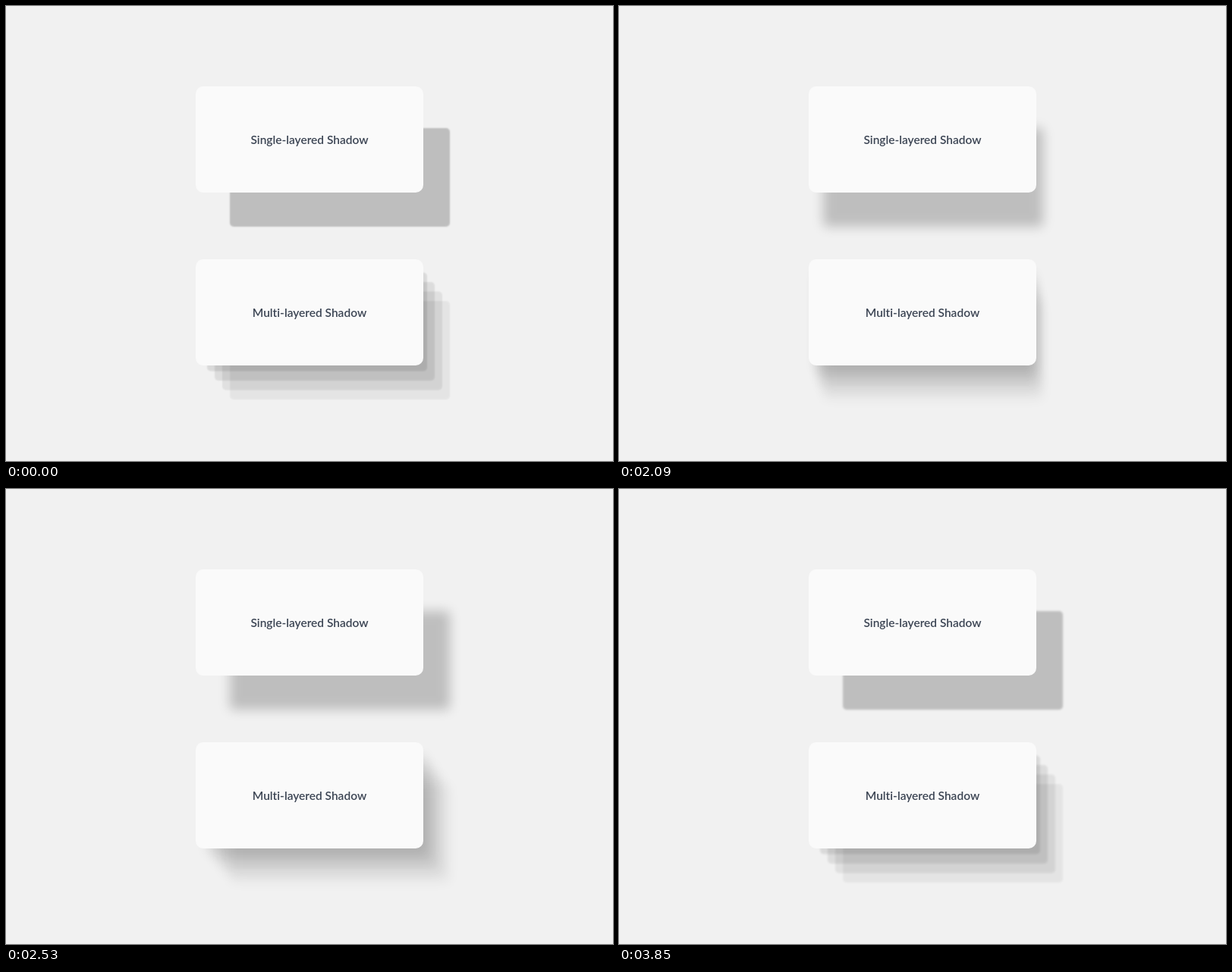
These frames come from a looping animation (800x600 px, 4.18 s). An HTML page:

```html
<!DOCTYPE html>
<html lang="en">
<head>
<meta charset="utf-8">
<title>Layered shadows</title>
<style>
  html, body { margin: 0; width: 100%; height: 100%; overflow: hidden; background: #f1f1f1; }
  .card {
    position: absolute; left: 250px; width: 300px; height: 140px;
    display: flex; align-items: center; justify-content: center;
    border-radius: 10px; background: #fafafa; color: #3b4453;
    font: 600 15.5px/20px Lato, "Open Sans", sans-serif;
    font-variant-ligatures: none;
  }
  #single { top: 106px; }
  #multi { top: 334px; }
</style>
</head>
<body>
<div class="card" id="single">Single-layered Shadow</div>
<div class="card" id="multi">Multi-layered Shadow</div>
<script>
const LOOP = 4180, TICK = 110, LAYERS = 4;
const single = document.getElementById('single');
const multi = document.getElementById('multi');

// 0 to 1 between two times
const ramp = (t, from, to) => Math.min(1, Math.max(0, (t - from) / (to - from)));

// Out and back between two times; skew above 1 puts the peak later
const swing = (t, from, to, skew) => Math.sin(Math.PI * ramp(t, from, to) ** skew);

const shadow = (x, y, blur, alpha) =>
  `${x.toFixed(2)}px ${y.toFixed(2)}px ${blur}px -5px rgba(0,0,0,${alpha})`;

function draw(now) {
  const t = Math.floor(now % LOOP / TICK) * TICK;
  const x = 40 - 74 * swing(t, 1980, 2530, 1.35);
  const y = 50 - 25 * swing(t, 2640, 3190, 0.8);
  const blur = 2 + 13 * ramp(t, 1320, 1540) - 12 * ramp(t, 3740, 3850);

  single.style.boxShadow = shadow(x, y, blur, 0.21);
  multi.style.boxShadow = Array.from({ length: LAYERS }, (_, i) => {
    const k = (i + 1) / LAYERS;
    return shadow(x * k, y * k, blur, 0.1 - 0.05 * k * k);
  }).join(',');
}

const start = performance.now();
function loop() {
  draw(performance.now() - start);
  requestAnimationFrame(loop);
}
loop();
</script>
</body>
</html>
```
